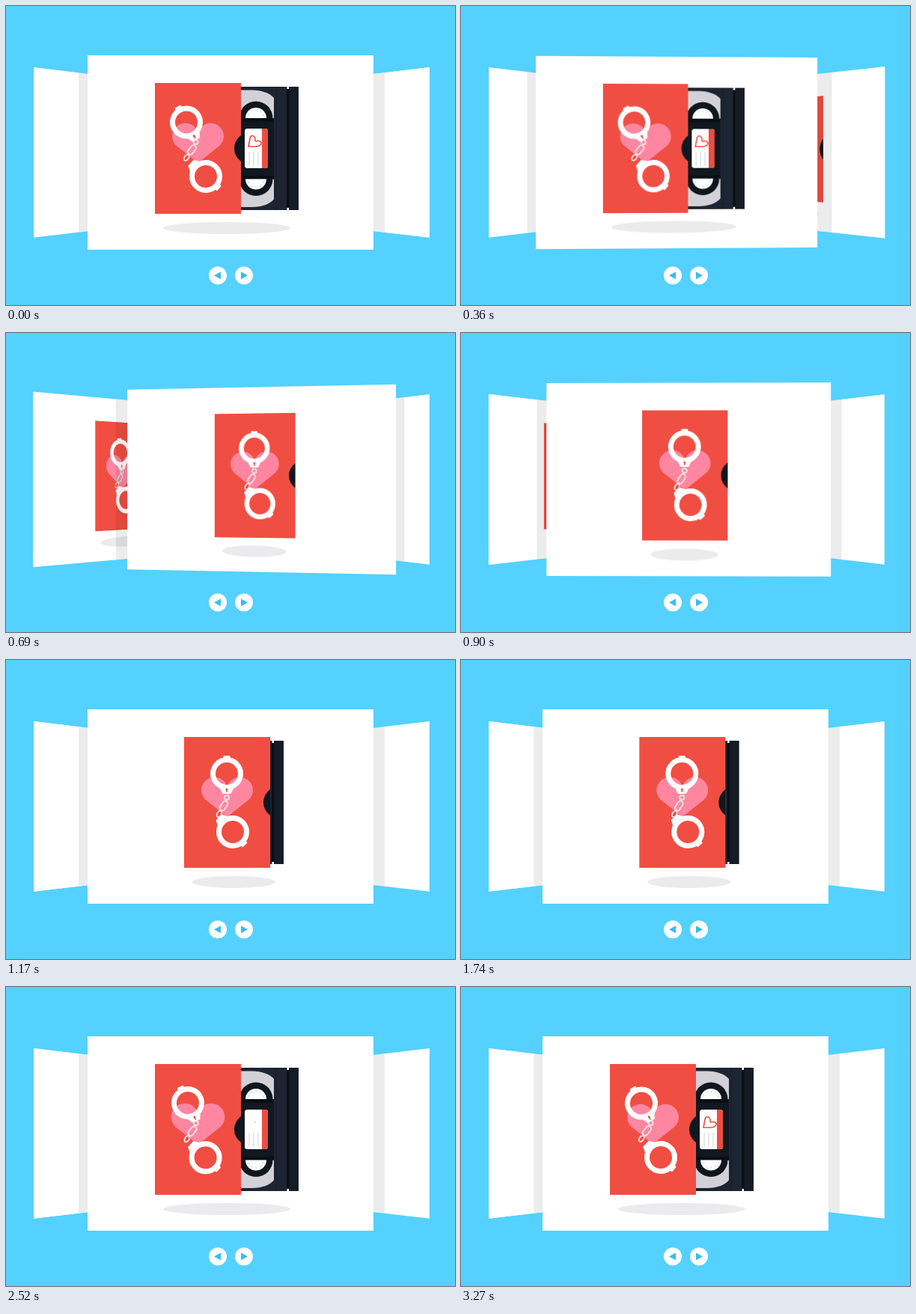
An HTML page without scripts that plays this animation: 600x400 px, repeating every 3.3 s.

```html
<!DOCTYPE html>
<html lang="en">
<head>
<meta charset="utf-8">
<title>Tape carousel</title>
<style>
@property --box { syntax: "<length>"; inherits: true; initial-value: 199px; }
@property --tape { syntax: "<length>"; inherits: true; initial-value: 391px; }
@property --swing { syntax: "<number>"; inherits: true; initial-value: 1; }
@property --beat { syntax: "<number>"; inherits: true; initial-value: 1; }
@property --draw { syntax: "<number>"; inherits: true; initial-value: 0; }

html, body { margin: 0; width: 100%; height: 100%; overflow: hidden; background: #54d1ff; }
.stage { position: relative; width: 600px; height: 400px; overflow: hidden; }
.stage > svg { position: absolute; left: 0; top: 0; }

/* Carousel panels */
.panel {
  position: absolute; left: 109px; top: 66px; width: 382px; height: 259.5px;
  overflow: hidden; background: #fff;
  --left: perspective(1200px) translate3d(-204.5px, 0, -335px) rotateY(60deg);
  --mid: perspective(1200px) translate3d(0, 0, 0) rotateY(0deg);
  --right: perspective(1200px) translate3d(208px, 0, -335px) rotateY(-60deg);
}
.panel svg { display: block; }
.shade {
  position: absolute; inset: 0; background: rgba(0, 0, 0, .075);
  animation: shade 3300ms infinite;
}
.rest-left { transform: var(--left); --a: 106px; --b: -217px; }
.rest-right { transform: var(--right); --a: 154px; --b: -105px; }
.out {
  z-index: 2; --p: var(--mid); --q: var(--left); --a: 414px; --b: 106px;
  animation: slide 3300ms infinite, shut 3300ms ease-in-out infinite;
}
.in {
  z-index: 1; --p: var(--right); --q: var(--mid); --a: -105px; --b: -351px;
  animation: slide 3300ms infinite, raise 3300ms infinite, reveal 3300ms ease-in-out infinite;
}
.out .shade { animation: shade 3300ms infinite, appear 3300ms infinite; }
.in .shade { animation: shade 3300ms infinite, vanish 3300ms infinite; }

@keyframes slide {
  0%, 4.15% { transform: var(--p); animation-timing-function: cubic-bezier(.76, 0, .24, 1); }
  31.64%, 100% { transform: var(--q); }
}
@keyframes shade {
  0%, 4.15% { transform: translateX(var(--a)); animation-timing-function: cubic-bezier(.76, 0, .24, 1); }
  31.64%, 100% { transform: translateX(var(--b)); }
}
@keyframes raise { 0%, 17.87% { z-index: 1; } 17.88%, 100% { z-index: 3; } }
@keyframes appear { 0%, 17.87% { opacity: 0; } 17.88%, 100% { opacity: 1; } }
@keyframes vanish { 0%, 17.87% { opacity: 1; } 17.88%, 100% { opacity: 0; } }

/* Tape and sleeve */
@keyframes shut {
  0%, 17% { --box: 199px; --tape: 391px; --swing: 1; }
  23%, 100% { --box: 238px; --tape: 352px; --swing: 0; }
}
@keyframes reveal {
  0% { --box: 238px; --tape: 352px; --swing: 0; --beat: 1; --draw: 1; }
  31.5% { --tape: 352px; animation-timing-function: ease-out; }
  35.4% { --tape: 371px; }
  50.9% { --box: 238px; --tape: 371px; --swing: 0; }
  64.5% { --box: 246px; --tape: 388px; --swing: -.06; }
  69% { --beat: 1; }
  72.7% { --box: 199px; --tape: 391px; --swing: .8; }
  76.3% { --swing: .87; --beat: 1.04; --draw: .99; }
  83% { --beat: 1; }
  89.4% { --draw: 0; }
  92% { --swing: 1; }
  100% { --box: 199px; --tape: 391px; --swing: 1; --beat: 1; --draw: 0; }
}
.floor {
  cx: calc((var(--box) + var(--tape)) / 2);
  rx: calc((var(--tape) - var(--box)) / 2 - 11px);
}
.tape { transform: translateX(var(--tape)); }
.box { transform: translateX(var(--box)); }
.heart { transform: translate(57.5px, 182.5px) scale(var(--beat)); }
.doodle { stroke-dasharray: 1 2; stroke-dashoffset: var(--draw); }
.cuff-top {
  transform: translate(calc(57px - 15px * var(--swing)), calc(152px + 3.5px * var(--swing)))
    rotate(calc(-29deg * var(--swing)));
}
.cuff-low {
  transform: translate(calc(65px + 3px * var(--swing)), calc(230px - 2px * var(--swing)))
    rotate(calc(137deg - 5deg * var(--swing)));
}
.chain {
  transform: translate(calc(57px - 2px * var(--swing)), calc(180px - 2px * var(--swing)))
    rotate(calc(6deg * var(--swing)));
}
</style>
</head>
<body>
<div class="stage">
  <svg width="600" height="400">
    <defs>
      <g id="reel">
        <path d="M-78 150V112.500H-62Q-42 113-33 123V150Z" fill="#d3d1d8"/>
        <circle cx="-57" cy="150" r="22.500" fill="#10161e"/>
        <circle cx="-57" cy="150" r="14" fill="#fff"/>
        <circle cx="-57" cy="150" r="10.500" fill="none" stroke="#cfd0d6" stroke-dasharray="3 3"/>
      </g>
      <g id="cuff">
        <circle r="18.500" fill="none" stroke="#fff" stroke-width="7"/>
        <rect x="-4.500" y="-24" width="9" height="6" rx="1" fill="#fff"/>
        <path d="M-11 16H11L5.500 27H-5.500Z" fill="#fff"/>
      </g>
      <g id="art">
        <ellipse class="floor" cy="297" ry="8" fill="#ebebed"/>
        <g class="tape">
          <rect x="-112" y="108" width="96.500" height="165" fill="#1e2532"/>
          <rect x="-13" y="108" width="13" height="165" fill="#151c26"/>
          <rect x="-16" y="111" width="3.500" height="159" fill="#0a0f15"/>
          <use href="#reel"/>
          <use href="#reel" transform="matrix(1 0 0 -1 0 381.500)"/>
          <rect x="-112" y="150" width="79" height="81.500" fill="#121820"/>
          <path d="M-112 152.500H-33M-112 229H-33" stroke="#0a0f15" stroke-width="4"/>
          <path d="M-30 108V273" stroke="#171e29"/>
          <rect x="-72" y="164" width="31" height="53" rx="3.500" fill="#fff"/>
          <path d="M-49 164h4.500a3.500 3.500 0 0 1 3.500 3.500v46a3.500 3.500 0 0 1-3.500 3.500H-49Z" fill="#ee4d40"/>
          <path d="M-66 195V214M-60 195V214M-54 195V214" stroke="#c8c8ce" stroke-width=".8"/>
          <path class="doodle" pathLength="1" d="M-58 181C-57 173-64 171-65 177L-67 188L-57 188C-47 188-48 178-58 181"
            fill="none" stroke="#ee4d40" stroke-width="1.600"/>
        </g>
        <g class="box">
          <rect y="103" width="115" height="175" fill="#f04e42"/>
          <path d="M115 173A21.500 21.500 0 0 0 115 208Z" fill="#10171f"/>
          <path class="heart" d="M0 27.500L-29.400 4A17.500 17.500 0 1 1 0-12.600A17.500 17.500 0 1 1 29.400 4Z" fill="#ff86a1"/>
          <g class="chain" fill="none" stroke="#e8dfe3" stroke-width="2">
            <circle cy="4" r="3"/>
            <rect x="-3.500" y="-7" width="7" height="14" rx="3.500" transform="translate(-4 15) rotate(32)"/>
            <ellipse cx="-10" cy="26" rx="2.800" ry="4.500" transform="rotate(30 -10 26)"/>
          </g>
          <g class="cuff-top">
            <use href="#cuff"/>
            <path d="M0 21V25" stroke="#f04e42" stroke-width="1.500"/>
            <circle cy="21" r="1.500" fill="#f04e42"/>
          </g>
          <use class="cuff-low" href="#cuff"/>
        </g>
      </g>
    </defs>
    <g fill="#fff">
      <circle cx="283" cy="360.500" r="12"/>
      <circle cx="318" cy="360.500" r="12"/>
    </g>
    <path d="M278 360.500L287 355.500V365.500ZM323 360.500L314 355.500V365.500Z" fill="#36bdf2"/>
  </svg>

  <div class="panel rest-left"><div class="shade"></div></div>
  <div class="panel rest-right"><div class="shade"></div></div>
  <div class="panel out">
    <svg width="382" height="260" viewBox="109 66 382 260"><use href="#art"/></svg>
    <div class="shade"></div>
  </div>
  <div class="panel in">
    <svg width="382" height="260" viewBox="109 66 382 260"><use href="#art"/></svg>
    <div class="shade"></div>
  </div>
</div>
</body>
</html>
```
